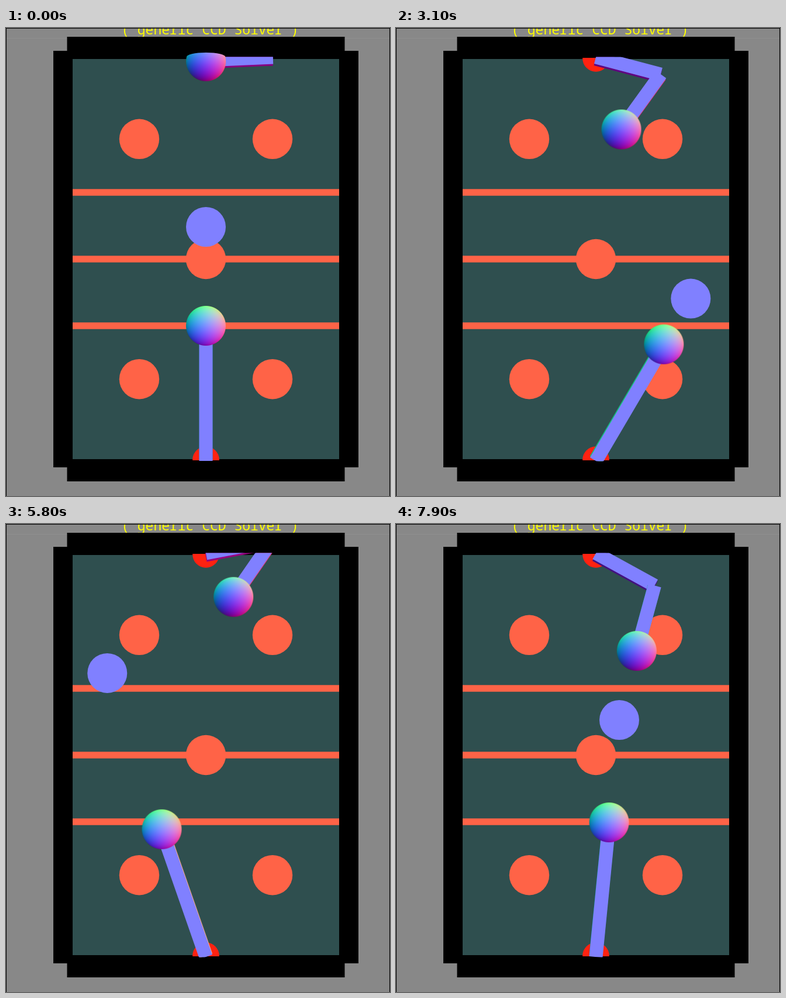
An HTML page with a canvas that plays this animation: 657 px wide and 800 px high, repeating every 8 s.

```html
<!DOCTYPE html>
<html lang="en">
<head>
<meta charset="utf-8">
<title>Air hockey arms</title>
<style>
  html, body { margin: 0; width: 100%; height: 100%; overflow: hidden; background: #888; }
  canvas { display: block; }
</style>
</head>
<body>
<canvas id="stage" width="657" height="800"></canvas>
<script>
const ctx = document.getElementById('stage').getContext('2d');
const LOOP = 8000, STEP = 100;
const MID = { x: 342, y: 395 };
const UNIT = 114;                       // a quarter of the table's width, and one arm link
const TOP = { x: MID.x, y: MID.y - 3 * UNIT - 1 };
const BOTTOM = { x: MID.x, y: MID.y + 3 * UNIT + 1 };
const REACH = 229, BAR = 23, R = 34;
const LIFT = 1.006;                     // bars stand higher, so they look larger
const BLUE = '#8080ff', TOMATO = '#ff6347', RED = '#ff2211';

// The puck runs straight between hits: time, x, y
const hits = [
  [0, 342, 340], [2050, 342, 241], [2400, 392, 334], [3260, 530, 492],
  [4800, 315, 171], [5600, 148, 238], [6700, 287, 331], [7900, 382, 335]
];
// The top arm eases between poses: time, upper and forearm angle clockwise from the right
const poses = [
  [0, 0, 177.5], [1200, 58.7, 193.8], [2400, 48.9, 144.2], [3800, -19.5, 107.5],
  [4800, -13.3, 139.6], [6200, -10, 121], [6700, 43.4, 112.3], [7900, 28.8, 105.3]
];

const linear = f => f;
const smooth = f => f * f * (3 - 2 * f);

function sample(keys, t, ease) {
  const i = keys.findIndex(k => k[0] >= t);
  if (i < 1) return keys.at(i).slice(1);
  const a = keys[i - 1], b = keys[i], f = ease((t - a[0]) / (b[0] - a[0]));
  return [1, 2].map(n => a[n] + (b[n] - a[n]) * f);
}

// Smooth bump from 0 to 1 and back
function pulse(t, mid, half) {
  return Math.abs(t - mid) < half ? (1 + Math.cos(Math.PI * (t - mid) / half)) / 2 : 0;
}

function polar(p, angle, len) {
  return { x: p.x + len * Math.cos(angle), y: p.y + len * Math.sin(angle) };
}

function lift(p) {
  return { x: MID.x + (p.x - MID.x) * LIFT, y: MID.y + (p.y - MID.y) * LIFT };
}

function rect(color, x0, y0, x1, y1) {
  ctx.fillStyle = color;
  ctx.fillRect(x0, y0, x1 - x0, y1 - y0);
}

function centred(color, halfW, halfH, y = MID.y) {
  rect(color, MID.x - halfW, y - halfH, MID.x + halfW, y + halfH);
}

function disc(color, x, y, r) {
  ctx.fillStyle = color;
  ctx.beginPath();
  ctx.arc(x, y, r, 0, 7);
  ctx.fill();
}

function clipped(makePath, draw) {
  ctx.save();
  ctx.beginPath();
  makePath();
  ctx.clip();
  draw();
  ctx.restore();
}

// A flat bar with the thin side that faces the middle of the stage
function bar(from, to) {
  const a = lift(from), b = lift(to);
  const len = Math.hypot(b.x - a.x, b.y - a.y);
  const ux = (b.x - a.x) / len, uy = (b.y - a.y) / len;
  const ox = (MID.x - (a.x + b.x) / 2) * 0.009, oy = (MID.y - (a.y + b.y) / 2) * 0.009;
  const side = ux * oy > uy * ox ? 1 : -1;
  const nx = -uy * side, ny = ux * side;
  const strip = (color, dx, dy) => {
    ctx.save();
    ctx.transform(ux, uy, -uy, ux, a.x + dx, a.y + dy);
    rect(color, 0, -BAR / 2, len, BAR / 2);
    ctx.restore();
  };
  strip(`rgb(${128 + 127 * nx},${128 - 127 * ny},128)`, ox, oy);
  strip(BLUE, 0, 0);
}

const SIZE = 72;
const ballCanvas = document.createElement('canvas');
ballCanvas.width = ballCanvas.height = SIZE;
const ballCtx = ballCanvas.getContext('2d');
const ballData = ballCtx.createImageData(SIZE, SIZE);

// Ball coloured by its surface normals, turned with the line of sight
function ball(p) {
  const tilt = Math.atan((MID.y - p.y) / 950), c = Math.cos(tilt), s = Math.sin(tilt);
  const turn = Math.atan((p.x - MID.x) / 950), tc = Math.cos(turn), ts = Math.sin(turn);
  for (let j = 0, i = 0; j < SIZE; j++) {
    for (let k = 0; k < SIZE; k++, i += 4) {
      const x = (k + 0.5 - SIZE / 2) / R, y = (SIZE / 2 - j - 0.5) / R;
      const d = Math.hypot(x, y), z = Math.sqrt(Math.max(0, 1 - d * d));
      const ny = y * c - z * s, z1 = y * s + z * c;
      const nx = x * tc - z1 * ts, nz = x * ts + z1 * tc;
      const alpha = Math.min(1, Math.max(0, (1 - d) * R + 0.5));
      ballData.data.set([128 + 127 * nx, 128 + 127 * ny, 128 + 127 * nz, 255 * alpha], i);
    }
  }
  ballCtx.putImageData(ballData, 0, 0);
  // The walls cut the ball along a rounded edge
  clipped(() => {
    ctx.rect(111, 50, 462, 691);
    if (p.y < 50 + R) ctx.ellipse(p.x, 50, R, 8, 0, 0, 7);
    if (p.x < 111 + R) {
      ctx.moveTo(119, p.y);
      ctx.ellipse(111, p.y, 8, R, 0, 0, 7);
    }
  }, () => ctx.drawImage(ballCanvas, p.x - SIZE / 2, p.y - SIZE / 2));
}

function backdrop(topArm) {
  rect('#888', 0, 0, 657, 800);
  rect('#909090', 0, 17, 657, 18);
  clipped(() => ctx.rect(0, 0, 657, 16), topArm);
  ctx.fillStyle = '#ff0';
  ctx.font = '500 23px "Noto Sans Mono", "DejaVu Sans Mono", monospace';
  ctx.textAlign = 'center';
  ctx.fillText('( generic CCD Solver )', 349, 11);
  ctx.strokeStyle = '#000';
  ctx.strokeRect(0.5, 0.5, 656, 800);
}

function table() {
  centred('#000', 261, 356);
  centred('#000', 237.5, 380);
  centred('#2f4f4f', 2 * UNIT, 3 * UNIT);
  for (const row of [-1, 0, 1]) {
    centred(TOMATO, 2 * UNIT, UNIT / 20, MID.y + row * UNIT);
    for (const col of row ? [-1, 1] : [0])
      disc(TOMATO, MID.x + col * UNIT, MID.y + row * 1.8 * UNIT, 0.3 * UNIT);
  }
  clipped(() => ctx.rect(114, 51, 456, 688), () => {
    for (const base of [TOP, BOTTOM]) disc(RED, base.x, base.y, 0.2 * UNIT);
  });
}

function draw(t) {
  const [px, py] = sample(hits, t, linear);
  const [pose, fore] = sample(poses, t, smooth);
  // The arm dips behind the wall, then overshoots far to the left
  const upper = pose - 35 * pulse(t, 400, 400) + 90 * pulse(t, 1500, 300);
  const rad = Math.PI / 180;
  const elbow = polar(TOP, upper * rad, UNIT), hand = polar(elbow, fore * rad, UNIT);
  const low = polar(BOTTOM, Math.atan2(py - BOTTOM.y, px - BOTTOM.x), REACH);
  const topArm = () => { bar(TOP, elbow); bar(elbow, hand); };

  backdrop(topArm);
  table();
  disc(BLUE, px, py, R);
  clipped(() => ctx.rect(110, 49.5, 464, 691), () => {
    topArm();
    bar(BOTTOM, low);
  });
  ball(hand);
  ball(low);
}

function frame(now) {
  draw(Math.floor(now % LOOP / STEP) * STEP);
  requestAnimationFrame(frame);
}
draw(0);
requestAnimationFrame(frame);
</script>
</body>
</html>
```
